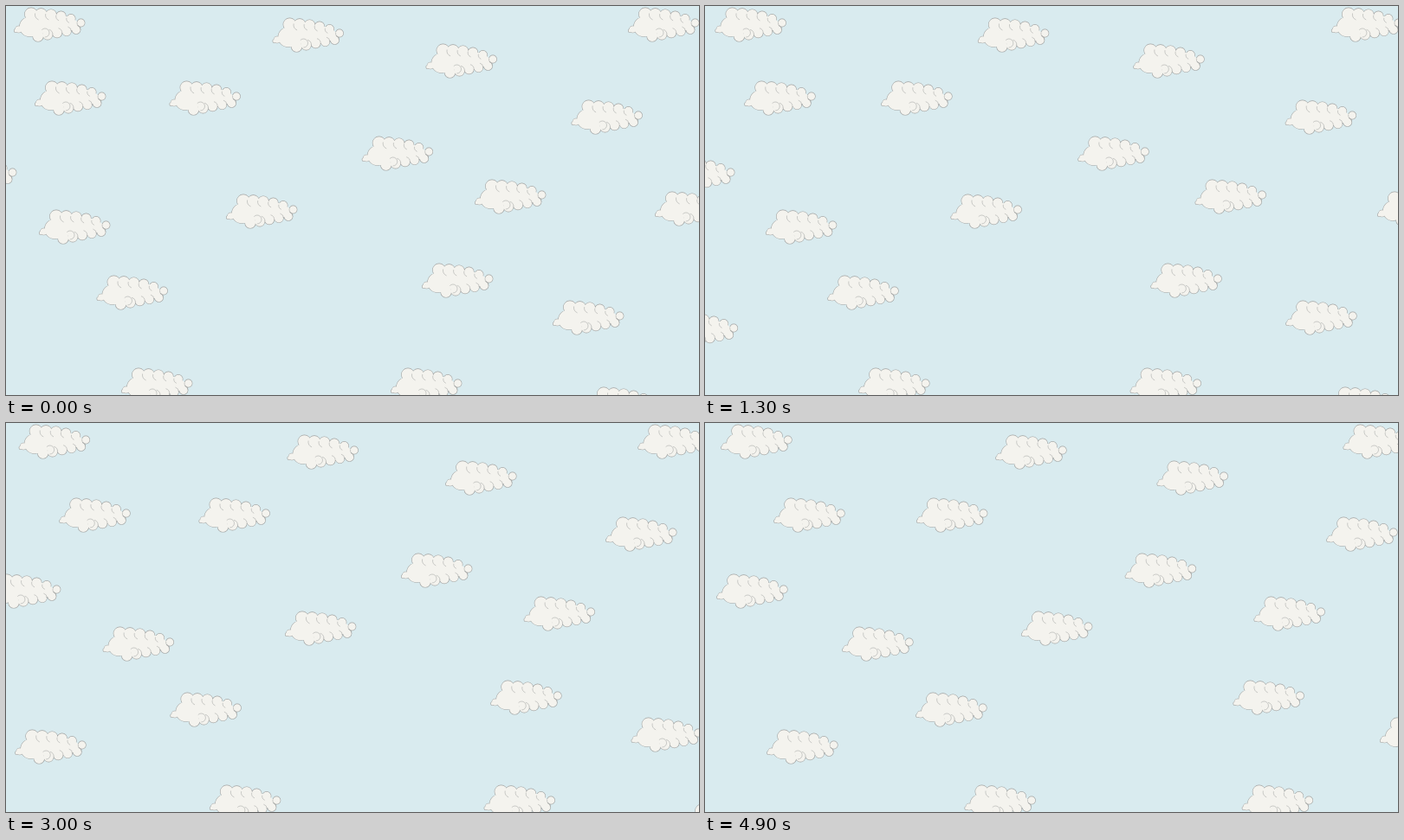
Recreate the animation shown at these times as an HTML page with a canvas. Size 800 by 450 pixels, loop 5 s.

```html
<!DOCTYPE html>
<html lang="en">
<head>
<meta charset="utf-8">
<title>Drifting clouds</title>
<style>
  html, body { margin: 0; width: 100%; height: 100%; overflow: hidden; background: #d9ebef; }
  canvas { display: block; }
</style>
</head>
<body>
<canvas id="sky" width="800" height="450"></canvas>
<script>
const ctx = document.getElementById('sky').getContext('2d');
const LOOP = 5000, STEP = 100, DRIFT = 0.1887;
const SKY = '#d9ebef', WHITE = '#f4f3ee', LINE = '#a3a5a4';

// Start points from top to bottom: the lower a cloud, the faster it drifts.
const starts = [
  [9, 1], [718, 1], [307.5, 13], [484.5, 43], [33, 86],
  [188.5, 86], [652.5, 108], [410.7, 150], [-70, 174], [541, 200],
  [749, 214], [254, 217], [38, 235], [480, 297], [104.5, 311],
  [631, 340], [-86, 354], [133, 418], [444, 418], [670, 440]
];

const outer = new Path2D(), inner = new Path2D(), curls = new Path2D();

function arc(path, x, y, r, from = 0, to = 2 * Math.PI) {
  path.moveTo(x + r * Math.cos(from), y + r * Math.sin(from));
  path.arc(x, y, r, from, to);
}

function puff(x, y, r) {
  arc(outer, x, y, r + 0.3);
  arc(inner, x, y, r - 0.3);
}

// Tail and large head on the left, then rows of puffs shrinking to the right.
puff(2.5, 27.5, 2.2);
puff(5.5, 26, 4);
puff(18, 23, 11.5);
for (let i = 0; i < 6; i++) {
  const x = 20 + 11.5 * i, y = 8.5 + 0.08 * i ** 3, r = 7.6 - 0.6 * i;
  puff(x, y, r);
  if (i) arc(curls, x, y, r, 2, 3.3);
}
for (let i = 0; i < 5; i++) {
  const x = 28 + 11 * i, y = 34 - 1.9 * i, r = 6.3 - 0.3 * i;
  puff(x, y, r);
  if (i) arc(curls, x, y, r, -1.3, 0);
}
arc(curls, 36, 30, 5, -2.4, 1.6);
inner.ellipse(42, 20, 32, 11, 0, 0, 2 * Math.PI);

function drawCloud(x, y) {
  ctx.save();
  ctx.translate(x, y);
  ctx.fillStyle = ctx.strokeStyle = LINE;
  ctx.fill(outer);
  ctx.fillStyle = WHITE;
  ctx.fill(inner);
  ctx.lineWidth = 0.55;
  ctx.stroke(curls);
  ctx.restore();
}

function draw(now) {
  const tick = Math.floor((now % LOOP) / STEP);
  ctx.fillStyle = SKY;
  ctx.fillRect(0, 0, 800, 450);
  starts.forEach(([x, y], i) => drawCloud(x + (i + 1) * DRIFT * tick, y));
  requestAnimationFrame(draw);
}
draw(performance.now());
</script>
</body>
</html>
```
